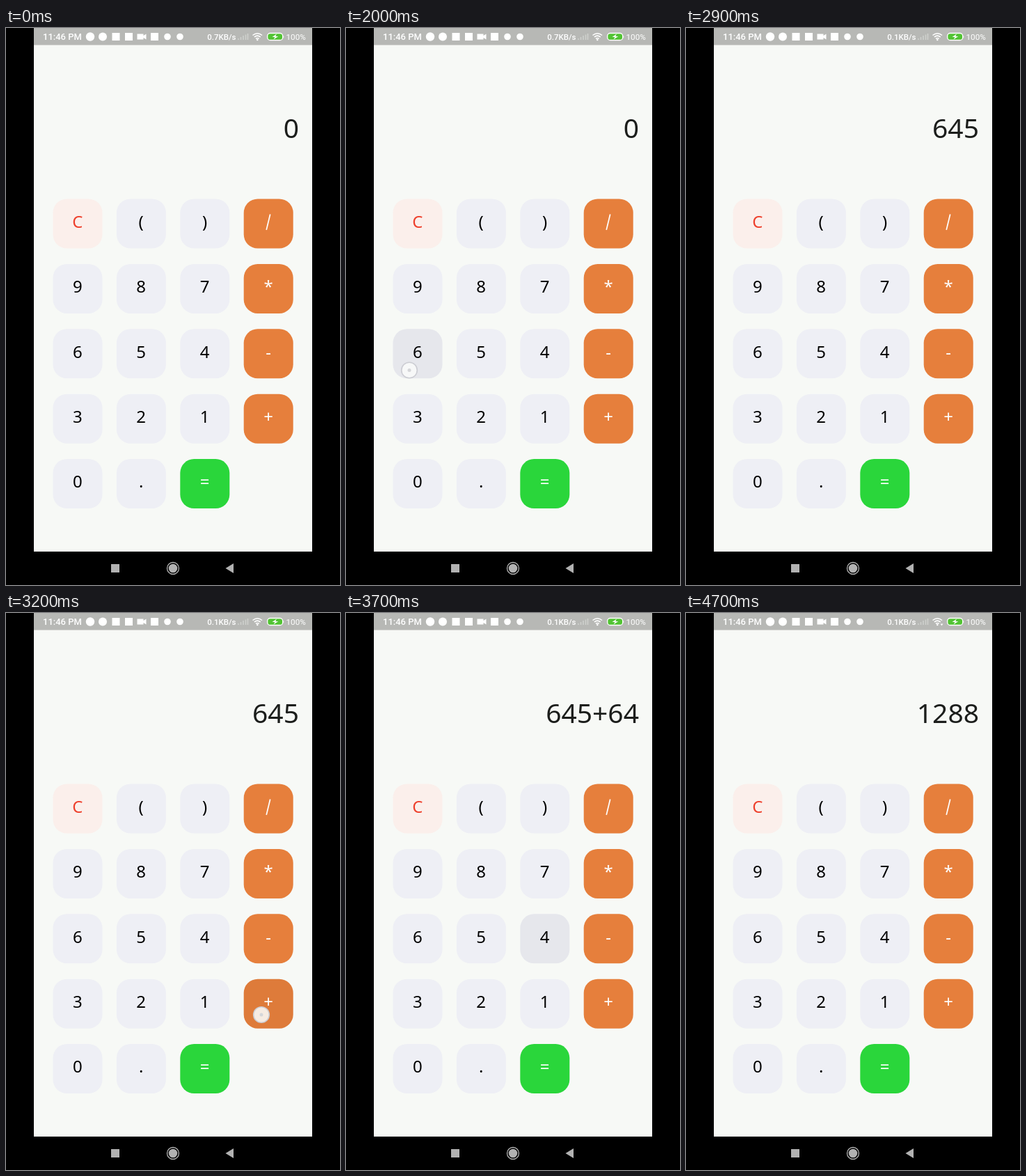
An HTML page that plays this animation: 480x800 px, repeating every 5 s.

```html
<!DOCTYPE html>
<html lang="en">
<head>
<meta charset="utf-8">
<title>Calculator</title>
<style>
  html, body { margin: 0; width: 100%; height: 100%; overflow: hidden; background: #000; }
  svg { display: block; width: 480px; height: 800px; }
  .status { font: 500 13px Roboto, sans-serif; fill: #fff; }
  .key { font: 24px "Noto Sans", sans-serif; text-anchor: middle; }
  #display { font: 500 39px "Noto Sans", sans-serif; text-anchor: end; fill: #1c1e1c; }
</style>
</head>
<body>
<svg viewBox="0 0 480 800">
  <rect width="480" height="800"/>
  <rect x="40" width="400" height="752" fill="#f7f9f6"/>
  <rect x="40" width="400" height="24.5" fill="#b7b8b5"/>

  <g class="status">
    <text x="53" y="17">11:46 PM</text>
    <text id="speed" x="330.5" y="16.5" font-size="11.5" text-anchor="end" style="font-size:11.5px"></text>
    <text x="402.5" y="17" style="font-size:11.7px;font-weight:400">100%</text>
    <circle cx="121" cy="12.5" r="6.2"/>
    <circle cx="139" cy="12.5" r="6"/>
    <rect x="152.5" y="7" width="11" height="11"/>
    <rect x="171" y="7" width="11" height="11"/>
    <path d="M188.5 8.5h9v2.5l4-2.5v8l-4-2.5v2.500h-9z"/>
    <rect x="208" y="7" width="11" height="11"/>
    <circle cx="232" cy="12.5" r="4.800"/>
    <circle cx="250" cy="12.5" r="4.800"/>
    <path d="M334 17v-2M337.500 17v-4M341 17v-6M344.500 17v-7.500M347.500 17v-9" stroke="#d0d1ce" stroke-width="1.500"/>
    <path d="M354.500 10.500q6.800-5.500 13.600 0M356.800 13q4.500-3.700 9 0M359 15.300q2.300-1.800 4.600 0" fill="none" stroke="#fff" stroke-width="1.500"/>
    <circle cx="361.300" cy="17" r="1.200"/>
    <path id="traffic" d="M365.500 15.500h4l-2 2.800z"/>
    <rect x="375.700" y="7.500" width="22" height="10" rx="4" fill="#51c332" stroke="#fff" stroke-width="1.300"/>
    <path d="M398.500 10.500q1.500 2 0 4z"/>
    <path d="M389 8.500l-6.500 4.600h4l-2 3.500 6.800-4.700h-4z"/>
  </g>

  <text id="display" x="421" y="157.500"></text>
  <g id="keys"></g>
  <g id="touch">
    <circle r="11.300" fill="#f9faf9" fill-opacity=".88" stroke="#cccdd3" stroke-width="1.600"/>
    <circle id="dot" r="2.500" fill="#d5d6d9"/>
  </g>

  <g fill="#b2b2b2">
    <rect x="151" y="770" width="12" height="12"/>
    <circle cx="240" cy="776" r="6.300"/>
    <circle cx="240" cy="776" r="8.500" fill="none" stroke="#b2b2b2" stroke-width="1.300"/>
    <path d="M315.500 776l11.500-7v14z"/>
  </g>
</svg>
<script>
const $ = id => document.getElementById(id);
const shades = {};

function addKey(label, i) {
  const col = i % 4, row = Math.floor(i / 4);
  const x = 67.5 + col * 91.4, y = 245.500 + row * 93.4;
  let fill = "#eeeff5", ink = "#000";
  if (label === "C") [fill, ink] = ["#fbefeb", "#ee402c"];
  if (label === "=") [fill, ink] = ["#2ad63b", "#fff"];
  if (col === 3) [fill, ink] = ["#e67f3c", "#fff"];
  const box = `x="${x}" y="${y}" width="71" height="71" rx="20"`;
  const mark = label === "/"
    ? `<path d="M${x + 38} ${y + 22}l-5.500 22.500" stroke="#fff" stroke-width="1.700"/>`
    : `<text class="key" x="${x + 35.3}" y="${y + 41.300}" fill="${ink}">${label}</text>`;
  $("keys").insertAdjacentHTML("beforeend",
    `<rect ${box} fill="${fill}"/><rect ${box} id="shade${i}" opacity="0"/>${mark}`);
  shades[label] = $("shade" + i);
}
[..."C()/987*654-321+0.="].forEach(addKey);

// Finger down/up times, finger position, and when the key is darkest (0: never)
const taps = [
  { key: "6", down: 2000, up: 2100, x: 91, y: 491.5, lit: 2000 },
  { key: "4", down: 2200, up: 2300, x: 276, y: 487, lit: 2300 },
  { key: "5", down: 2400, up: 2600, x: 187, y: 486, lit: 2500 },
  { key: "+", down: 3100, up: 3300, x: 367, y: 577, lit: 3200 },
  { key: "6", down: 3400, up: 3500, x: 82.500, y: 485.5, lit: 0 },
  { key: "4", down: 3600, up: 3700, x: 276, y: 486, lit: 3700 },
  { key: "3", down: 3800, up: 4000, x: 88, y: 578, lit: 3900 },
  { key: "=", down: 4400, up: 4500, x: 275, y: 671, lit: 4400 }
];
const readings = [
  [0, "0"], [2100, "6"], [2300, "64"], [2500, "645"], [3300, "645+"],
  [3500, "645+6"], [3700, "645+64"], [4000, "645+643"], [4500, "1288"]
];

function draw(t) {
  $("display").textContent = readings.filter(r => r[0] <= t).pop()[1];
  $("speed").textContent = t < 2800 ? "0.7KB/s" : "0.1KB/s";
  $("traffic").style.opacity = t < 4000 ? 0 : 1;

  for (const key in shades) {
    const tap = taps.find(p => p.key === key && p.lit && t >= p.lit && t < p.lit + 300);
    shades[key].setAttribute("opacity", tap ? 0.035 * (1 - (t - tap.lit) / 300) : 0);
  }

  const finger = taps.find(p => t >= p.down && t < p.up);
  $("touch").style.display = finger ? "" : "none";
  if (finger) {
    $("touch").setAttribute("transform", `translate(${finger.x} ${finger.y})`);
    $("dot").style.display = finger.lit && t >= finger.lit ? "" : "none";
  }
}

const start = performance.now();
function tick() {
  const t = (performance.now() - start) % 5000;
  draw(Math.floor(t / 100) * 100);
  requestAnimationFrame(tick);
}
tick();
</script>
</body>
</html>
```
